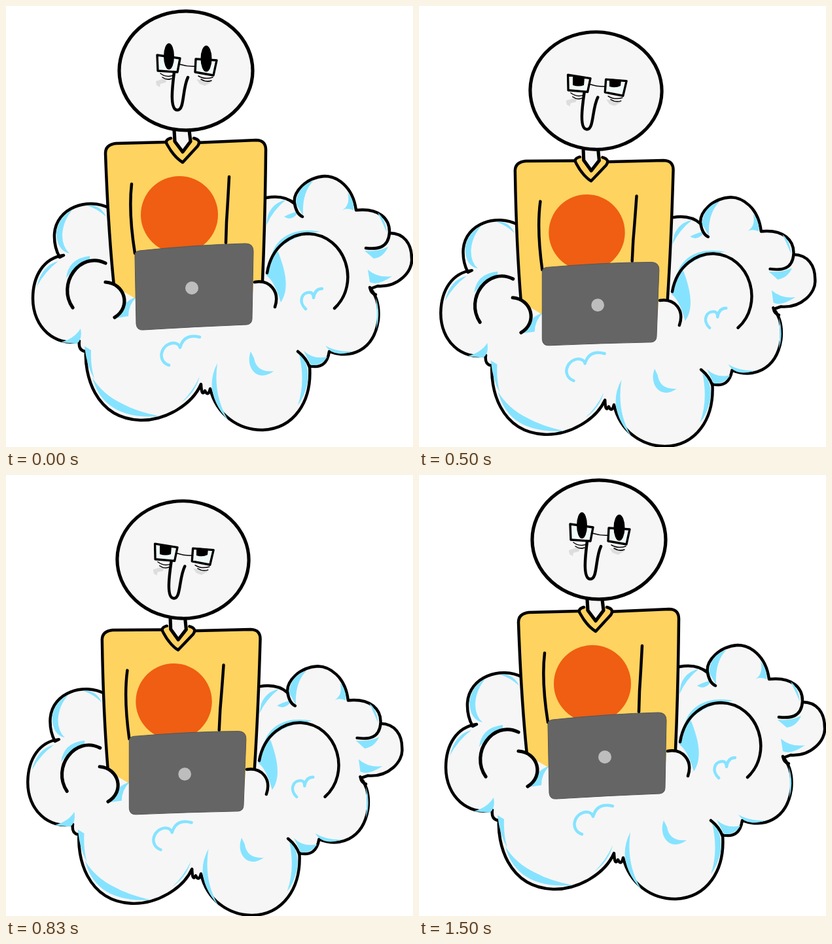
These frames come from a looping animation (622 by 674 pixels, 1.83 s). An HTML page:

```html
<!DOCTYPE html>
<html lang="en">
<head>
<meta charset="utf-8">
<title>Working on a cloud</title>
<style>
  html, body { margin: 0; width: 100%; height: 100%; overflow: hidden; background: #fff; }
  svg { display: block; width: 100%; height: 100%; }
  .line { fill: none; stroke: #000; stroke-width: 4.5; stroke-linecap: round; stroke-linejoin: round; }
  .thin { stroke-width: 1.5; }
  .bold { stroke-width: 5.2; }
  .white { fill: #f6f6f6; }
  .yellow { fill: #ffd35f; }
  .blue { fill: #86e3ff; }
  .swirl { fill: none; stroke: #86e3ff; stroke-width: 4.5; stroke-linecap: round; stroke-linejoin: round; }
  .look { display: none; }
</style>
</head>
<body>
<svg viewBox="0 0 622 674">
  <g class="pose">
    <!-- cloud -->
    <path class="line white" d="M158 309 C125 292 77 308 74 348 Q73 368 82 384 L88 381
      C58 385 41 412 41 447 C41 492 76 521 112 512 Q110 527 122 528
      C120 560 134 630 205 633 C245 634 285 608 298 578 Q299 598 304 588 Q309 598 312 585
      C322 625 355 648 392 648 C440 646 468 605 464 550 Q490 556 494 528
      C525 540 562 528 569 480 Q572 450 557 432 L568 428
      C600 430 622 405 620 386 C620 363 608 347 586 347
      C587 325 570 308 535 312 C530 275 505 260 487 260
      C458 262 438 285 441 302 Q425 288 398 293 Z"/>
    <path class="blue" d="M77 347 Q79 324 102 311 Q87 328 86 350 Q86 368 97 378 Q78 374 77 347Z
      M124 305 Q144 303 153 322 Q140 310 124 305Z
      M47 429 Q55 396 80 390 Q60 405 47 429Z M92 416 Q95 386 128 382 L128 390 Q104 398 92 416Z
      M84 514 Q105 508 114 493 Q117 510 108 516Z M120 520 L130 526 Q129 550 135 570 Q123 550 120 520Z"/>
    <path class="blue" d="M132 568 C142 605 170 632 235 627 Q200 620 178 608 Q148 594 132 568Z
      M323 546 Q300 590 340 634 Q316 595 323 546Z M296 566 Q290 590 268 606 Q285 590 296 566Z
      M448 532 Q464 545 461 575 Q456 598 446 610 Q458 575 448 532Z
      M374 528 C365 552 384 577 409 558 Q383 561 379 538Z
      M405 385 C412 350 445 338 480 345 Q430 350 405 385Z
      M400 398 Q408 374 416 376 C425 400 435 430 420 453 Q410 420 398 412Z"/>
    <path class="blue" d="M443 302 Q445 275 470 267 Q452 285 454 320Z M522 285 Q533 298 531 312 Q521 308 514 312 Q527 304 522 285Z
      M398 335 Q399 303 428 296 Q408 312 398 335Z M425 322 Q437 330 448 314 Q438 315 425 322Z
      M548 374 Q568 376 584 368 Q577 384 562 386Z M553 403 Q568 416 590 413 Q568 428 556 422Z
      M565 445 Q573 470 566 494 Q568 465 565 445Z M488 519 Q505 529 530 528 Q500 538 488 519Z
      M455 527 Q470 541 491 536 Q483 550 466 549Z M568 316 Q580 325 582 346 Q574 328 568 316Z"/>
    <path class="swirl" d="M249 549 C231 543 235 518 255 515 Q264 515 266 522 Q272 500 296 506
      M458 463 C446 452 452 436 466 438 Q470 440 470 446 Q472 432 483 432"/>
    <path class="line" d="M586 347 C584 370 568 372 550 370 M441 302 Q444 318 453 322
      M446 528 Q459 538 464 552 M556 430 Q558 440 565 441"/>

    <!-- shirt -->
    <path class="yellow" d="M152 225 Q152 212 168 210 L246 208 L290 209 L382 205 Q398 205 397 222 L392 420 L375 440 L196 446 L165 428Z"/>
    <path class="line" d="M165 428 Q156 340 152 225 Q152 212 168 210 L246 208 M290 209 L382 205 Q398 205 397 222 Q396 330 392 420
      M192 272 Q187 315 197 378 M341 261 Q339 300 337 330 L336 362"/>
    <circle cx="265" cy="319" r="59" fill="#ef5e12"/>
    <path class="line yellow" d="M252 202 Q241 205 247 213 Q257 231 270 239 L293 214 Q299 205 287 202"/>
    <path class="line white bold" d="M257 190 L258 207 L270 223 L282 207 L280 190"/>

    <!-- puffs over the shirt -->
    <path class="white" d="M103 462 C75 425 115 374 152 393 L152 422 C182 424 192 460 166 476 L150 500Z"/>
    <path class="blue" d="M168 477 Q180 450 199 445 Q187 457 187 474Z"/>
    <path class="line bold" d="M102 461 C77 425 113 374 152 393 M152 422 C182 424 192 460 166 476"/>
    <path class="white" d="M378 423 C400 412 420 440 411 460 L376 488Z"/>
    <path class="line" d="M380 422 C403 418 419 436 411 460 M399 408 C406 365 438 348 462 348 C520 350 542 425 502 462"/>

    <!-- laptop -->
    <path fill="#656565" stroke="#555" d="M197 383 Q196 375 204 374 Q290 365 366 363 Q378 363 378 375 L376 478 Q376 486 368 487 Q290 490 210 495 Q200 496 199 486Z"/>
    <circle cx="284" cy="431" r="10" fill="#bdbdbd"/>

    <!-- head -->
    <ellipse class="line white bold" cx="275" cy="98.900" rx="102" ry="91"/>
    <path fill="#ddd" d="M229 115 L247 109 L244 117 L236 119 L235 124 L230 121Z M291 112 L315 116 L304 122 L296 119Z"/>
    <path class="line thin" d="M236 103 Q245 110 256 106 M239 109 Q246 114 253 111 M294 107 Q304 113 316 109 M298 112 Q306 117 314 114"/>
    <path class="line" d="M257 101 C254 125 250 159 262 159 C273 159 269 128 278 109"/>
    <path fill="#effaf9" d="M231 75 L266 80 L262 101 L232 99Z M290 81 L322 83 L317 106 L289 101Z"/>
  </g>

  <g class="look" id="open">
    <ellipse cx="249" cy="77" rx="8" ry="20"/>
    <ellipse cx="306" cy="80.500" rx="8.500" ry="20"/>
  </g>
  <g class="look" id="frown">
    <path d="M236 94 L253 96 Q253 125 245 126 Q237 125 236 94Z M291 98 L308 101 Q310 128 300 130 Q291 128 291 98Z"/>
    <path class="line" style="stroke-linecap:butt" d="M229 92 Q240 96 259 95 M290 97 Q302 103 320 103"/>
  </g>
  <g class="look" id="squint">
    <path d="M235 107 L253 109 L252 115 Q244 119 235 115Z M291 111 L309 113 L308 119 Q300 123 291 119Z"/>
  </g>
  <g class="look" id="bored">
    <path d="M235 107 L253 109 L252 121 Q244 124 235 121Z M291 111 L309 113 L308 122 Q300 126 291 123Z"/>
  </g>
  <g class="look" id="raised">
    <path d="M236 104 Q237 89 245 89 Q253 90 253 106 Q252 125 245 126 Q237 125 236 104Z M292 107 Q293 93 301 93 Q309 94 309 110 Q308 129 300 130 Q292 128 292 107Z"/>
    <path class="line" d="M232 75 Q244 67 257 73 M291 76 Q304 70 318 79"/>
  </g>

  <!-- glasses -->
  <g class="pose">
    <path class="line" style="stroke-width:3.4" d="M231 75 L266 80 L262 101 L232 99Z M290 81 L322 83 L317 106 L289 101Z"/>
    <path class="line thin" d="M265 89 Q278 93 290 92"/>
  </g>
</svg>
<script>
  const LOOP = 1830;
  // Start time of each expression
  const steps = [
    [0, "open"], [170, "frown"], [330, "squint"], [500, "bored"], [670, "raised"],
    [830, "bored"], [1170, "squint"], [1330, "frown"], [1500, "open"]
  ];
  const LEANING = "matrix(.986 .0187 -.0187 .986 1.2 26.8)";
  const poses = document.querySelectorAll(".pose");
  const looks = document.querySelectorAll(".look");
  const start = performance.now();

  function draw(now) {
    const time = Math.max(0, now - start) % LOOP;
    const current = steps.filter(([from]) => from <= time).pop()[1];
    for (const pose of poses) pose.setAttribute("transform", current === "open" ? "" : LEANING);
    for (const look of looks) look.style.display = look.id === current ? "inline" : "none";
    requestAnimationFrame(draw);
  }
  draw(start);
</script>
</body>
</html>
```
